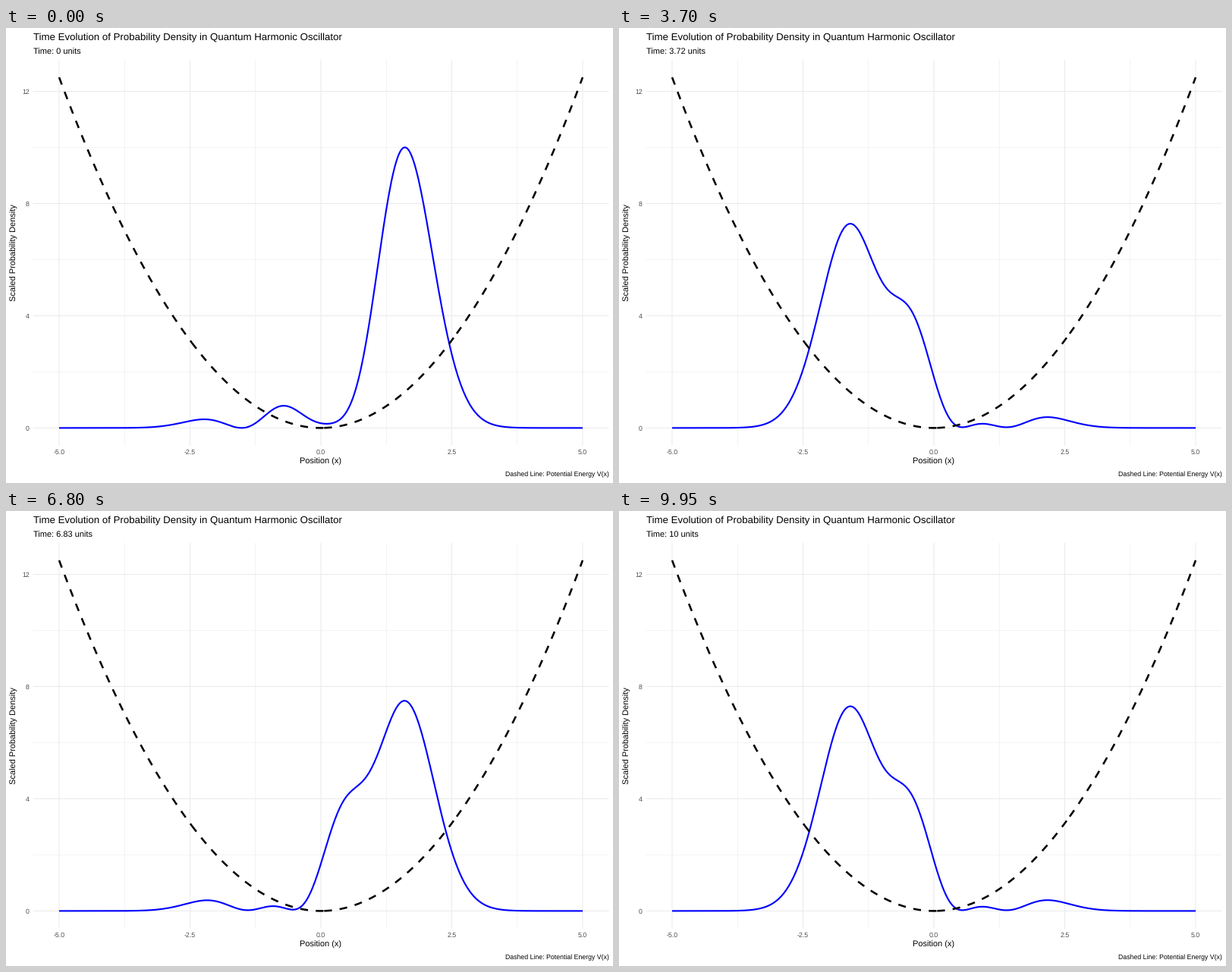
Animation, 800 px wide and 600 px high, one loop 10 s. Source, as a matplotlib script:

```python
import math

import matplotlib.pyplot as plt
import numpy as np
from matplotlib.animation import FuncAnimation

W, H, DPI = 800, 600, 100
FRAMES, INTERVAL = 200, 50
T_END = 10
PT = 72 / DPI  # points per pixel

plt.rcParams["font.family"] = "Liberation Sans"
plt.rcParams["text.hinting"] = "none"

LEFT, RIGHT, TOP, BOTTOM = 35.5, 794.5, 41.9, 550.6
GRID, TICK = "#EBEBEB", "#4D4D4D"


def px(x):
    return 415 + 69 * x


def py(y):
    return 527.4 - 36.99 * y


fig = plt.figure(figsize=(W / DPI, H / DPI), dpi=DPI, facecolor="white")
ax = fig.add_axes([0, 0, 1, 1])
ax.set_xlim(0, W)
ax.set_ylim(H, 0)
ax.axis("off")


def line(x, y, width, color, **style):
    return ax.plot(x, y, lw=width * PT, color=color, snap=False,
                   solid_capstyle="butt", **style)[0]


def label(x, y, text, size, color="black", **style):
    style.setdefault("va", "baseline")
    return ax.text(x, y, text, fontsize=size * PT, color=color, **style)


def grid(xs, ys, width):
    for y in ys:
        line([LEFT, RIGHT], [py(y)] * 2, width, GRID)
    for x in xs:
        line([px(x)] * 2, [TOP, BOTTOM], width, GRID)


x_ticks = np.arange(-5, 5.1, 2.5)
y_ticks = range(0, 13, 4)
grid(x_ticks[:-1] + 1.25, (2, 6, 10), 0.53)
grid(x_ticks, y_ticks, 1.07)

for v in x_ticks:
    label(px(v), 562, f"{v:.1f}", 8.8, TICK, ha="center")
for v in y_ticks:
    label(30.6, py(v) + 3.2, str(v), 8.8, TICK, ha="right")

label(35.5, 16, "Time Evolution of Probability Density in Quantum Harmonic Oscillator", 13.2)
clock = label(35.5, 35, "", 11)
label(415, 575, "Position (x)", 11, ha="center")
label(13.5, 296.3, "Scaled Probability Density", 11, ha="center",
      rotation=90, rotation_mode="anchor")
label(794.5, 591, "Dashed Line: Potential Energy V(x)", 8.8, ha="right")

# Equal mix of the four lowest eigenstates
x = np.linspace(-5, 5, 400)
states = np.array([
    np.polynomial.hermite.hermval(x, [0] * n + [1])
    * np.exp(-x**2 / 2) / math.sqrt(2**n * math.factorial(n))
    for n in range(4)
])
energy = np.arange(4) + 0.5


def density(t):
    return np.abs(np.exp(-1j * energy * t) @ states) ** 2


scale = 10 / density(0).max()
wave = line(px(x), py(0 * x), 2.13, "#0000FF", solid_joinstyle="round")

# The dash pattern restarts along the potential curve
CHUNK = 101
for i in range(0, len(x), CHUNK):
    part = x[i:i + CHUNK + 1]
    line(px(part), py(part**2 / 2), 2.56, "black", linestyle=(0, (4, 4)),
         dash_capstyle="butt")


def update(i):
    t = T_END * i / (FRAMES - 1)
    wave.set_ydata(py(scale * density(t)))
    clock.set_text(f"Time: {round(t, 2):g} units")
    return wave, clock


anim = FuncAnimation(fig, update, frames=FRAMES, interval=INTERVAL,
                     repeat=True, repeat_delay=0)
plt.show()
```
